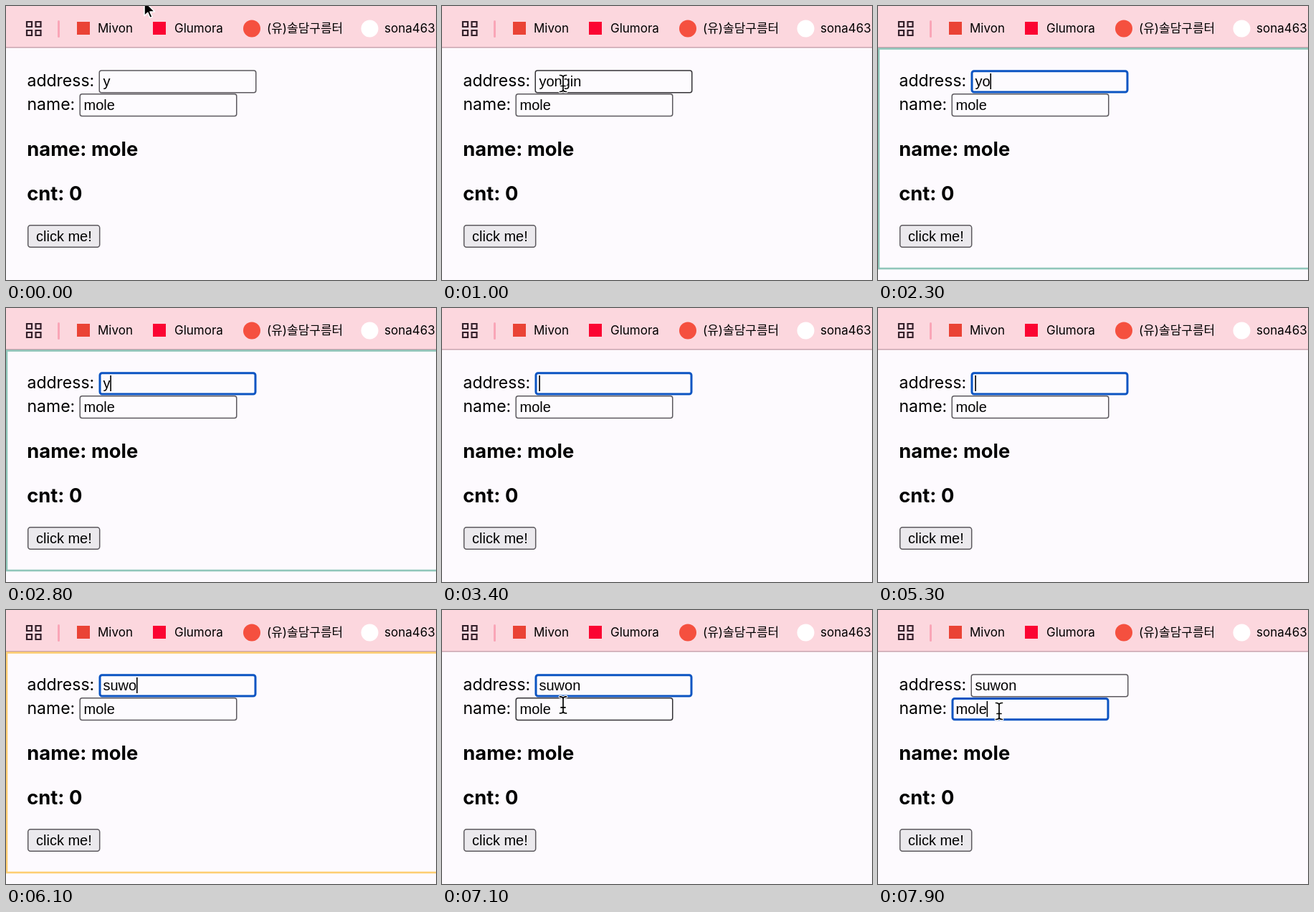
An HTML page for the animation above (8 s loop, 600 by 382 pixels).

```html
<!DOCTYPE html>
<html lang="en">
<head>
<meta charset="utf-8">
<title>Form demo</title>
<style>
  html, body { margin: 0; width: 100%; height: 100%; overflow: hidden; background: #fdfafe; }
  svg { display: block; width: 600px; height: 382px; }
  text { white-space: pre; fill: #000; }
  .bookmark { font: 17px Inter, "Noto Sans CJK KR", "Noto Sans CJK", sans-serif; fill: #33202a; }
  .label { font: 23px Inter, sans-serif; }
  .heading { font: 700 27.3px Inter, sans-serif; }
  .field { font: 20px "Liberation Sans", Arial, sans-serif; }
  .field.hangul { font: 18px "Noto Sans CJK KR", "Noto Sans CJK", sans-serif; }
  .box { fill: #fdfbfe; stroke: #5c595e; stroke-width: 1.5; }
  .box.hover { stroke: #343236; }
  .box.focus { stroke: #0b54c2; stroke-width: 3; }
  .button { fill: #ebe9ed; stroke: #5c595e; stroke-width: 1.5; }
</style>
</head>
<body>
<svg viewBox="0 0 600 382">
  <rect width="600" height="382" fill="#fdfafe"/>

  <!-- bookmark bar -->
  <rect width="600" height="57" fill="#fcd7de"/>
  <rect y="57" width="600" height="1.5" fill="#caa3ae"/>
  <path d="M29 22h7v7h-7zM41.500 22h7v7h-7zM29 34h7v7h-7zM41.500 34h7v7h-7z" fill="none" stroke="#33202a" stroke-width="2.2"/>
  <rect x="72" y="20" width="3" height="24" rx="1.5" fill="#f9a5b7"/>
  <rect x="99" y="22" width="18" height="18" fill="#ea4335"/>
  <rect x="205" y="22" width="18" height="18" fill="#fb0532"/>
  <circle cx="343" cy="31.500" r="12" fill="#f5503f"/>
  <circle cx="507.500" cy="31.500" r="12" fill="#fff"/>
  <g class="bookmark">
    <text x="128" y="37">Mivon</text>
    <text x="235" y="37">Glumora</text>
    <text x="364" y="37">(유)솔담구름터</text>
    <text x="528" y="37">sona463</text>
  </g>

  <!-- page -->
  <text class="label" x="29.500" y="111.600">address:</text>
  <rect class="box" id="addressBox"/>
  <text class="field" id="address" x="135.500" y="112"></text>
  <rect id="composing" x="135.500" y="115" height="2"/>
  <g id="lower">
    <text class="label" x="29.500" y="144.600">name:</text>
    <rect class="box" id="nameBox"/>
    <text class="field" id="name" x="108.500" y="145">mole</text>
    <text class="heading" x="29.300" y="209">name: mole</text>
    <rect class="button" x="30.700" y="305.700" width="100" height="30.600" rx="3.500"/>
    <text class="field" x="42" y="327.500">click me!</text>
  </g>
  <text class="heading" x="29.300" y="270.500">cnt: 0</text>
  <rect id="caret" width="1.6" height="22"/>

  <rect id="flash" x="1" y="59.500" width="640" height="306.500" fill="none" stroke-width="2.6" stroke-opacity=".7"/>

  <g id="arrow" stroke="#fff" stroke-width="1.2" stroke-linejoin="round">
    <path transform="scale(1.3)" d="M0 0V16L3.700 12.500 6 18 8.500 17 6.200 11.600H11.200Z"/>
  </g>
  <defs>
    <path id="beamShape" d="M-4.500-11.500Q0-11.500 0-8.500Q0-11.500 4.500-11.500M0-8.500V8.500M-4.500 11.500Q0 11.500 0 8.500Q0 11.500 4.500 11.500M-3 3.500H3"/>
  </defs>
  <g id="beam" fill="none" stroke-linecap="round">
    <use href="#beamShape" stroke="#fff" stroke-width="4"/>
    <use href="#beamShape" stroke="#000" stroke-width="1.7"/>
  </g>
</svg>

<script>
const DURATION = 8000, STEP = 100, FLASH_TIME = 250;
const TEAL = '#63b19e', GREEN = '#abb67d', GOLD = '#febc38';
const ADDRESS_FOCUS = 1300, NAME_FOCUS = 7600;

// [time, address value, colour of the re-render outline]
const edits = [
  [0, 'y'], [700, 'yongin'],
  [1700, 'yongi', TEAL], [1900, 'yong', TEAL], [2100, 'yon', TEAL], [2300, 'yo', TEAL],
  [2600, 'y', TEAL], [2900, '', TEAL],
  [3800, 'ㄴ', TEAL], [4100, '녀', TEAL], [4700, 'ㄴ', TEAL], [4900, '', GREEN],
  [5400, 's', GREEN], [5600, 'su', GREEN], [5800, 'suw', GOLD], [6000, 'suwo', GOLD],
  [6200, 'suwon', GOLD]
];

// the pointer glides from a to b and rests there until hidden
const moves = [
  { from: 0, to: 200, hide: 200, a: [193, -7], b: [193, -27] },
  { from: 700, to: 1000, hide: 1700, a: [181, -6], b: [169, 108] },
  { from: 6700, to: 7300, hide: DURATION, a: [169, 108], b: [169, 141] }
];

const el = id => document.getElementById(id);
const show = (node, on) => node.setAttribute('visibility', on ? 'visible' : 'hidden');
const setAttrs = (node, attrs) => Object.entries(attrs).forEach(([k, v]) => node.setAttribute(k, v));

function pointerAt(t) {
  const move = moves.find(m => t >= m.from && t < m.hide);
  if (!move) return null;
  const p = Math.min(1, (t - move.from) / (move.to - move.from));
  const eased = p * p * (3 - 2 * p);
  return move.a.map((v, i) => v + (move.b[i] - v) * eased);
}

function drawBox(box, x, y, height, focus, hover) {
  const inset = focus ? 1.5 : 0.75;
  box.setAttribute('class', 'box' + (focus ? ' focus' : hover ? ' hover' : ''));
  setAttrs(box, {
    x: x + inset, y: y + inset, rx: 3,
    width: 220 - 2 * inset, height: height - 2 * inset
  });
}

function render(t) {
  const [editTime, value, colour] = edits.filter(e => e[0] <= t).pop();
  const hangul = /[ㄱ-힣]/.test(value);
  const onName = t >= NAME_FOCUS;
  const onAddress = t >= ADDRESS_FOCUS && !onName;
  const pointer = pointerAt(t);
  const over = (x, y) => pointer && pointer[0] > x && pointer[0] < x + 220 && pointer[1] > y && pointer[1] < y + 32;
  const overAddress = over(129.5, 89), overName = over(102.5, 122);

  const address = el('address');
  address.textContent = value;
  address.setAttribute('class', hangul ? 'field hangul' : 'field');
  drawBox(el('addressBox'), 129.5, 89.2, hangul ? 33 : 32.3, onAddress, overAddress);
  drawBox(el('nameBox'), 102.5, 122, 32.3, onName, overName);
  el('lower').setAttribute('transform', `translate(0 ${hangul ? 0.8 : 0})`);

  const textWidth = value ? address.getComputedTextLength() : 0;
  show(el('composing'), hangul);
  el('composing').setAttribute('width', textWidth);

  const lastAction = onName ? NAME_FOCUS : Math.max(editTime, ADDRESS_FOCUS);
  show(el('caret'), (onAddress || onName) && (t - lastAction) % 1000 <= 500);
  setAttrs(el('caret'), onName
    ? { x: 108.2 + el('name').getComputedTextLength(), y: 127 }
    : { x: 135.3 + textWidth, y: 94 });

  show(el('flash'), colour && t - editTime < FLASH_TIME);
  if (colour) el('flash').setAttribute('stroke', colour);

  const beam = overAddress || overName;
  show(el('arrow'), pointer && !beam);
  show(el('beam'), pointer && beam);
  if (pointer) el(beam ? 'beam' : 'arrow').setAttribute('transform', `translate(${pointer})`);
}

const start = performance.now();
function tick() {
  const t = (performance.now() - start) % DURATION;
  render(Math.floor(t / STEP) * STEP);
  requestAnimationFrame(tick);
}
tick();
</script>
</body>
</html>
```
